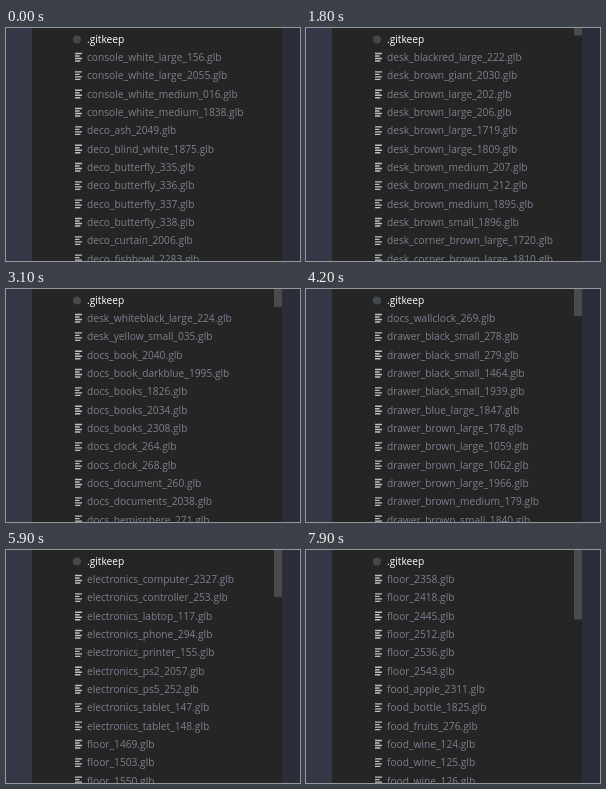
An HTML page that plays this animation: 294 px wide and 233 px high, repeating every 8 s.

```html
<!DOCTYPE html>
<html lang="en">
<head>
<meta charset="utf-8">
<title>File list scrolling</title>
<style>
  html, body { margin: 0; width: 100%; height: 100%; overflow: hidden; background: #343746; }
  svg { display: block; }
  text { font: 10.2px "Open Sans", "Noto Sans", sans-serif; fill: #7c808c; white-space: pre; }
  .selected { fill: #fff; }
</style>
</head>
<body>
<svg width="294" height="233" viewBox="0 0 294 233">
  <defs>
    <path id="file" d="M69 -7.6h7M69 -5.1h4.6M69 -2.6h7M69 -.1h5.4" stroke="#bcc1c4" stroke-width="1.4"/>
  </defs>
  <rect width="294" height="233" fill="#343746"/>
  <rect x="276" width="18" height="233" fill="#2b2d3a"/>
  <rect x="26" width="250" height="233" fill="#252526"/>
  <circle cx="71" cy="11.5" r="4" fill="#43494d"/>
  <text class="selected" x="81" y="14.8">.gitkeep</text>
  <g id="rows"></g>
  <rect id="thumb" x="268" width="8" fill="#4b4b4c"/>
</svg>
<script>
const LOOP = 8000, STEP = 100, VISIBLE = 12, PITCH = 18.33, BASELINE = 14.8;

// Each line: a name stem followed by its id numbers.
const floorIds = Array.from({ length: 31 }, (_, i) => 1573 + i * 25 + (i * 7) % 11).join(" ");
const files = `
console_white_large 156 2055
console_white_medium 016 1838
deco_ash 2049
deco_blind_white 1875
deco_butterfly 335 336 337 338
deco_curtain 2006
deco_fishbowl 2283
deco_flower 331
deco_frame 265
deco_lamp 1854
deco_mirror 2031
deco_radiator 2122
deco_slippad 2234
deco_star 270
deco_wallclock 2054
deco_you 2094
desk_bed_grey_large 203
desk_black_large 210 218
desk_black_medium 219
desk_blackgreen_large 223
desk_blackred_large 222
desk_brown_giant 2030
desk_brown_large 202 206 1719 1809
desk_brown_medium 207 212 1895
desk_brown_small 1896
desk_corner_brown_large 1720 1810
desk_ivory_medium 213
desk_orange_small 208
desk_pink_medium 216
desk_skyblue_medium 217
desk_white_large 220 2050
desk_white_medium 226
desk_whiteblack_large 221 224
desk_yellow_small 035
docs_book 2040
docs_book_darkblue 1995
docs_books 1826 2034 2308
docs_clock 264 268
docs_document 260
docs_documents 2038
docs_hemisphere 271
docs_holder 261 1997
docs_notebook 263
docs_paper 262
docs_stand 2041
docs_wallclock 269
drawer_black_small 278 279 1464 1939
drawer_blue_large 1847
drawer_brown_large 178 1059 1062 1966
drawer_brown_medium 179
drawer_brown_small 1840 1841 1967
drawer_grey_large 180 1060
drawer_grey_medium 181
drawer_grey_small 182 1848
drawer_ivory_large 183
drawer_pink_small 184
drawer_white_large 185 1061
drawer_white_medium 186 1465
drawer_white_small 187
electronics_aircon 149 1827
electronics_camera 150
electronics_charger 293
electronics_computer 111 112 113 1830 1994 2036 2053 2309 2327
electronics_controller 253
electronics_labtop 117
electronics_phone 294
electronics_printer 155
electronics_ps2 2057
electronics_ps5 252
electronics_tablet 147 148
floor 1469 1503 1550 ${floorIds} 2358 2418 2445 2512 2536 2543
food_apple 2311
food_bottle 1825
food_fruits 276
food_wine 124 125 126`.trim().split("\n").flatMap(line => {
  const [stem, ...ids] = line.split(" ");
  return ids.map(id => `${stem}_${id}.glb`);
});

// Scroll position as [time in ms, first visible row].
const scrollKeys = [[0, 0], [200, 3], [300, 3], [1100, 16], [2400, 35],
                    [3100, 46], [4200, 63], [5900, 101], [7900, 144]];

function firstRowAt(time) {
  const next = Math.max(1, scrollKeys.findIndex(([t]) => t >= time));
  const [t0, r0] = scrollKeys[next - 1], [t1, r1] = scrollKeys[next];
  return Math.round(r0 + (r1 - r0) * (time - t0) / (t1 - t0));
}

const rows = document.getElementById("rows");
const thumb = document.getElementById("thumb");
rows.innerHTML = Array.from({ length: VISIBLE }, (_, i) => {
  const y = BASELINE + PITCH * (i + 1);
  return `<use href="#file" y="${y}"/><text x="81" y="${y}"></text>`;
}).join("");
const labels = [...rows.querySelectorAll("text")];

let shownRow = -1;
function draw(now) {
  const time = Math.floor((now % LOOP) / STEP) * STEP;
  const first = firstRowAt(time);
  if (first !== shownRow) {
    shownRow = first;
    labels.forEach((label, i) => label.textContent = files[first + i]);
    thumb.setAttribute("height", Math.max(0, 2.2 + 0.525 * (first - 16)));
  }
  requestAnimationFrame(draw);
}
draw(performance.now());
</script>
</body>
</html>
```
